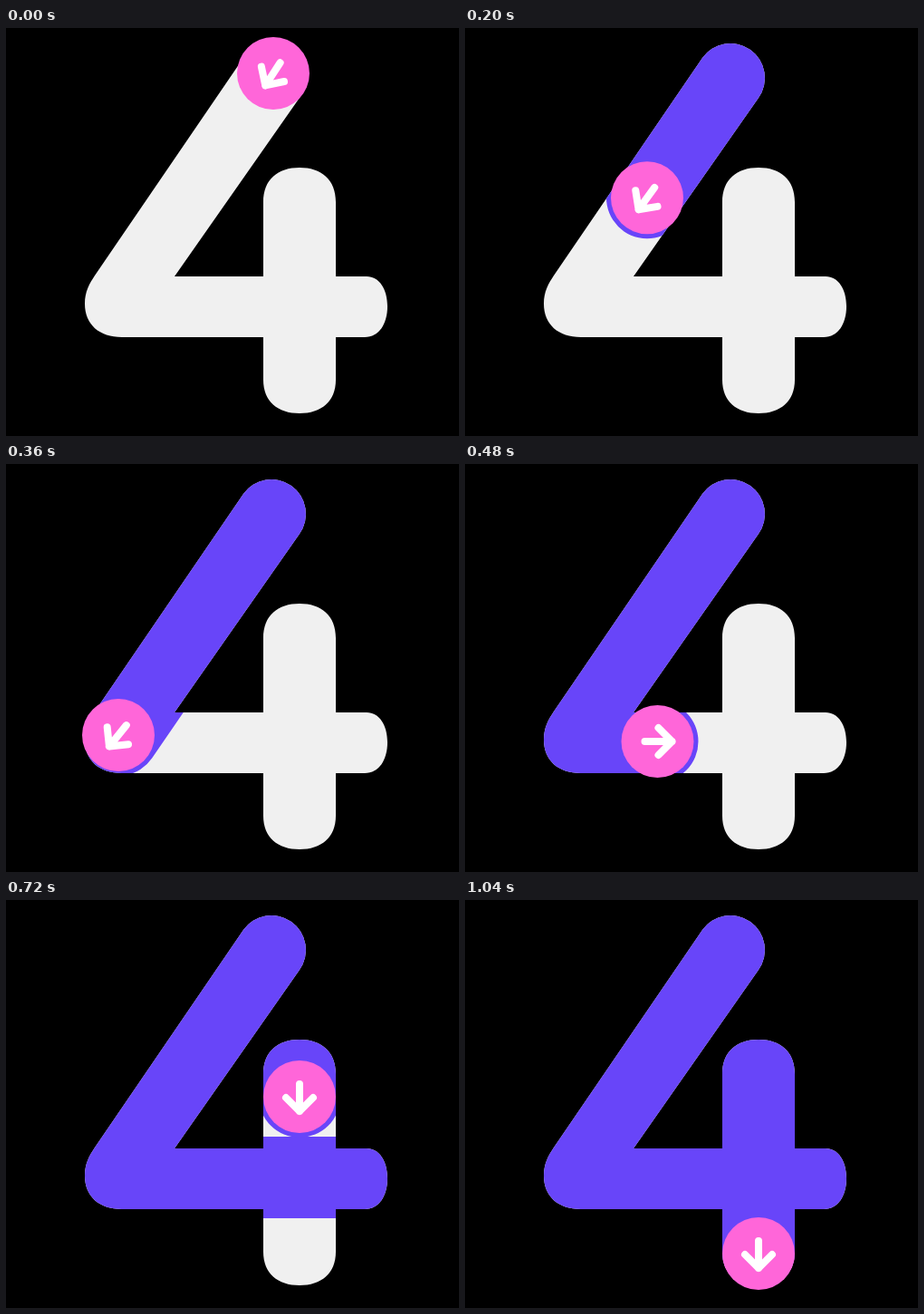
Write an HTML page with a canvas that moves like this. It is 500 by 450 pixels and loops after 3 s.

```html
<!DOCTYPE html>
<html lang="en">
<head>
<meta charset="utf-8">
<title>Tracing the number four</title>
<style>
  html, body { margin: 0; width: 100%; height: 100%; overflow: hidden; background: #000; }
  canvas { display: block; }
</style>
</head>
<body>
<canvas id="stage" width="500" height="450"></canvas>
<script>
const ctx = document.getElementById('stage').getContext('2d');
const LOOP = 3000, STEP = 40;
const LIGHT = '#f0f0f0', PURPLE = '#6845f9', PINK = '#ff66d9';

const digit = new Path2D(
  'M262 33A38 38 0 0 1 324 77L186 274H398C412 274 421 288 421 307S412 341 396 341' +
  'H128C103 341 87 327 87 304C87 291 92 282 98 273Z' +
  'M284 192C284 167 300 154 324 154S364 167 364 192V388C364 412 348 425 324 425S284 412 284 388Z');
const arrow = new Path2D('M-14 0H16M1 -15L16 0L1 15');

const START = [295, 50], CORNER = [119, 306], END = [381, 306], STEM = [324, 187];
const CORNER_TIME = 400, STEM_TIME = 600;

// time, x, y, arrow angle in degrees
const keys = [
  [0, ...START, 123], [120, 238, 133.5, 123], [280, 164, 241, 129], [360, 124, 299, 129],
  [CORNER_TIME, 144.5, 306, 0], [480, 212.5, 306, 0], [560, 285, 306, 0],
  [STEM_TIME, ...STEM, 90], [640, 324, 192, 90], [680, 324, 202, 90], [720, 324, 217, 90],
  [760, 324, 239, 90], [880, 324, 309, 90], [1040, 324, 390, 90]
];

function poseAt(time) {
  const next = keys.findIndex(key => key[0] > time);
  if (next < 0) return keys[keys.length - 1].slice(1);
  const a = keys[next - 1], b = keys[next];
  const k = (time - a[0]) / (b[0] - a[0]);
  return a.slice(1).map((value, i) => value + (b[i + 1] - value) * k);
}

function trail(...points) {
  ctx.beginPath();
  points.forEach(point => ctx.lineTo(...point));
  ctx.stroke();
}

function draw(time) {
  const [x, y, angle] = poseAt(time);
  const tip = [x, y];
  ctx.clearRect(0, 0, 500, 450);
  ctx.lineCap = ctx.lineJoin = 'round';
  ctx.fillStyle = LIGHT;
  ctx.fill(digit);

  ctx.save();
  ctx.clip(digit);
  ctx.strokeStyle = PURPLE;
  ctx.lineWidth = 90;
  if (time >= STEM_TIME) {
    trail(START, CORNER, END);
    if (time > STEM_TIME) trail(STEM, tip);
  } else if (time >= CORNER_TIME) {
    trail(START, CORNER, tip);
  } else if (time > 0) {
    trail(START, tip);
  }
  ctx.restore();

  ctx.save();
  ctx.translate(x, y);
  ctx.fillStyle = PINK;
  ctx.beginPath();
  ctx.arc(0, 0, 40, 0, Math.PI * 2);
  ctx.fill();
  ctx.rotate(angle * Math.PI / 180);
  ctx.strokeStyle = '#fff';
  ctx.lineWidth = 8;
  ctx.stroke(arrow);
  ctx.restore();
}

const begin = performance.now();
function tick() {
  const elapsed = (performance.now() - begin) % LOOP;
  draw(Math.floor(elapsed / STEP) * STEP);
  requestAnimationFrame(tick);
}
tick();
</script>
</body>
</html>
```
